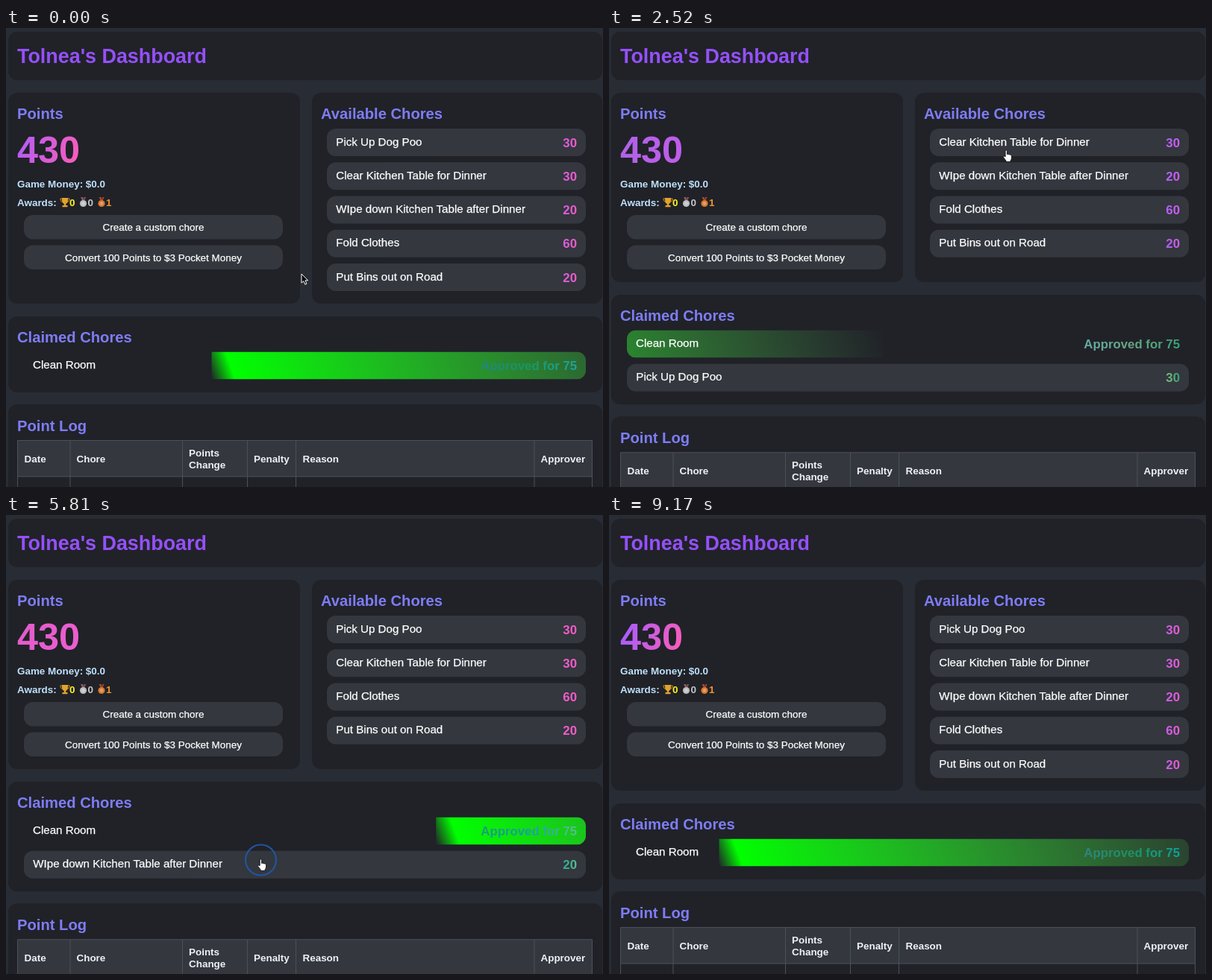
An HTML page that plays this animation: 800 px wide and 616 px high, repeating every 9.24 s.

```html
<!DOCTYPE html>
<html lang="en">
<head>
<meta charset="utf-8">
<title>Chore dashboard</title>
<style>
  html, body { margin: 0; width: 100%; height: 100%; overflow: hidden; background: #282c34; }
  svg { display: block; width: 100%; height: 100%; }
  text { font-family: "Liberation Sans", Arial, sans-serif; fill: #fff; font-size: 15.13px; }
  .t { stroke: #fff; stroke-width: .25px; }
  .b { font-weight: 700; }
  .h2 { font-weight: 700; font-size: 20.2px; fill: #7f7cf5; }
  .s { font-size: 13.44px; }
  .info { font-size: 13.44px; font-weight: 700; fill: #bfe0fb; }
  .th { font-size: 13.44px; font-weight: 700; fill: #eef1f5; }
  .num { font-size: 16.8px; font-weight: 700; text-anchor: end; }
  .panel { fill: #202228; }
  .row { fill: #34373e; }
</style>
</head>
<body>
<svg id="stage" viewBox="0 0 800 616" preserveAspectRatio="none">
  <defs>
    <linearGradient id="pointsInk" gradientUnits="userSpaceOnUse" x1="15" y1="150" x2="99" y2="176"></linearGradient>
    <linearGradient id="numInk" gradientUnits="userSpaceOnUse" x1="745" y1="0" x2="765" y2="0"></linearGradient>
    <linearGradient id="approvedInk" gradientUnits="userSpaceOnUse" x1="636" y1="0" x2="765" y2="0"></linearGradient>
    <linearGradient id="claimedInk" gradientUnits="userSpaceOnUse" x1="745" y1="0" x2="765" y2="0"></linearGradient>
    <linearGradient id="sweepInk" gradientUnits="userSpaceOnUse" x1="38" y1="141.6" x2="715" y2="-104.6">
      <stop offset="0" stop-color="#0f0" stop-opacity="0"/>
      <stop offset=".042" stop-color="#0f0"/>
      <stop offset="1" stop-color="#6d6" stop-opacity="0"/>
    </linearGradient>
    <clipPath id="rowClip"><rect x="24" width="753" height="37" rx="12"/></clipPath>
  </defs>
  <rect width="800" height="616" fill="#282c34"/>
  <rect class="panel" x="3" y="5" width="796" height="65" rx="12"/>
  <text class="b" x="15" y="47" style="font-size:26.9px;fill:#9550fb">Tolnea's Dashboard</text>

  <rect class="panel" id="left" x="3" y="87" width="391" rx="12"/>
  <text class="h2" x="15" y="122">Points</text>
  <text class="b" x="15" y="181" style="font-size:50.4px;fill:url(#pointsInk)">430</text>
  <text class="info" x="15" y="214">Game Money: $0.0</text>
  <text class="info" x="15" y="238.5">Awards:</text>
  <g fill="#e2a32c">
    <path d="M75 228h8v3q0 4-2.8 5v2h2.3v2.2h-7v-2.2h2.3v-2q-2.8-1-2.8-5z"/>
    <path d="M75 229h-2.2q0 4 3 4.5M83 229h2.2q0 4-3 4.5" fill="none" stroke="#c98a24"/>
  </g>
  <g id="medals"></g>
  <text class="info" x="85" y="238.5" style="fill:#fff21c">0</text>
  <text class="info" x="109.5" y="238.5" style="fill:#c4c6c9">0</text>
  <text class="info" x="134" y="238.5" style="fill:#f0932b">1</text>
  <rect class="row" x="24" y="251" width="347" height="32.5" rx="12"/>
  <text class="s t" x="197.5" y="272" text-anchor="middle">Create a custom chore</text>
  <rect class="row" x="24" y="291.5" width="347" height="32.5" rx="12"/>
  <text class="s t" x="197.5" y="313" text-anchor="middle">Convert 100 Points to $3 Pocket Money</text>

  <rect class="panel" id="right" x="410" y="87" width="389" rx="12"/>
  <text class="h2" x="422" y="122">Available Chores</text>
  <g id="available"></g>

  <g id="claimed">
    <rect class="panel" id="claimedPanel" x="3" width="796" rx="12"/>
    <text class="h2" x="15" y="34.5">Claimed Chores</text>
    <g transform="translate(0 47.5)">
      <g clip-path="url(#rowClip)"><rect id="sweep" width="753" height="37" fill="url(#sweepInk)"/></g>
      <text class="t" x="36" y="22.5">Clean Room</text>
      <text class="num" x="765" y="24.5" style="fill:url(#approvedInk)">Approved for 75</text>
    </g>
  </g>

  <g id="log">
    <rect class="panel" x="3" width="796" height="140" rx="12"/>
    <text class="h2" x="15" y="35.5">Point Log</text>
    <rect x="15.5" y="48.5" width="770" height="48.5" fill="#34373e"/>
    <path d="M15.5 130V48.5H785.5V130M15.5 97H785.5M86 48.5V130M236.5 48.5V130M323.5 48.5V130M388.5 48.5V130M708 48.5V130" fill="none" stroke="#4a515b"/>
    <g id="heads"></g>
  </g>

  <circle id="ring" r="20.5" fill="none" stroke="#1f559f" stroke-width="2.2"/>
  <g id="cursor" stroke-linejoin="round">
    <path id="arrow" d="M0 0V12.2L2.8 9.6 4.8 14.2 6.9 13.2 4.9 8.8H8.6Z" fill="#000" stroke="#fff" stroke-width="1"/>
    <path id="hand" d="M-1.3 8V.6a1.2 1.2 0 0 1 2.4 0V5q1.2-1 2.2.2 1.2-.7 2 .4 1.5-.4 1.7 1.2V10q-.3 2-1.4 3.5v1.3H-.4v-1.3L-3.8 9q-.6-1.8 1-1.6z" fill="#fff" stroke="#111" stroke-width=".9"/>
  </g>
</svg>
<script>
const LOOP = 9240, STEP = 70, PITCH = 45.25;
const $ = id => document.getElementById(id);

function add(parent, tag, attrs, text) {
  const el = document.createElementNS('http://www.w3.org/2000/svg', tag);
  for (const k in attrs) el.setAttribute(k, attrs[k]);
  if (text) el.textContent = text;
  return parent.appendChild(el);
}
const move = (el, x, y) => el.setAttribute('transform', `translate(${x} ${y})`);
const show = (el, on) => el.style.display = on ? '' : 'none';
const mix = (a, b, k) => a + (b - a) * k;

// Segment of a track [[at, ...], ...] around t, and the share passed.
function segment(track, t) {
  let i = 0;
  while (i < track.length - 2 && t >= track[i + 1][0]) i++;
  const a = track[i], b = track[i + 1];
  return [a, b, Math.min(1, Math.max(0, (t - a[0]) / (b[0] - a[0])))];
}
function along(track, t) {
  const [a, b, k] = segment(track, t);
  return a.slice(1).map((v, i) => mix(v, b[i + 1], k));
}
function blend(a, b, k) {
  const rgb = [0, 2, 4].map(i =>
    Math.round(mix(parseInt(a.slice(i, i + 2), 16), parseInt(b.slice(i, i + 2), 16), k)));
  return `rgb(${rgb})`;
}

// Ink colours, left to right, by phase of the shimmer.
const PHASES = [.07, .33, .62, .99];
const INKS = {
  pointsInk: ['f65fc0 955cff', '8066ff e05ade', 'a85cff ff5cb4', 'ff5cb0 e45ee0'],
  numInk: ['c45cf8 e05ce4', '9a62ff c45cf0', 'd05ce8 ee5ac8', 'ff5abc fa5ac4'],
  approvedInk: ['5cc88c acdf48 5c86b0', '6a94b4 3a80a8 22b04c', '268078 189458 109ca4', '18a878 18a4c4 7cd488'],
  claimedInk: ['94c860 5c86b0', '7cbc88 18a850', '18a458 1294a0', '30a8b0 7cd488']
};
const inkTracks = {};
for (const id in INKS) {
  const keys = INKS[id].map((s, i) => [PHASES[i], ...s.split(' ')]);
  const first = keys[0], last = keys[3];
  inkTracks[id] = [[last[0] - 1, ...last.slice(1)], ...keys, [first[0] + 1, ...first.slice(1)]];
  const n = first.length - 2;
  for (let i = 0; i <= n; i++) add($(id), 'stop', { offset: i / n });
}

const CHORES = [
  ['Pick Up Dog Poo', 30], ['Clear Kitchen Table for Dinner', 30],
  ['WIpe down Kitchen Table after Dinner', 20], ['Fold Clothes', 60], ['Put Bins out on Road', 20]
];
function choreRow(parent, [name, points], x, ink) {
  const g = add(parent, 'g', {});
  add(g, 'rect', { class: 'row', x, width: 777 - x, height: 37, rx: 12 });
  add(g, 'text', { class: 't', x: x + 12.3, y: 22.5 }, name);
  add(g, 'text', { class: 'num', x: 765, y: 24.5, style: `fill:url(#${ink})` }, String(points));
  return g;
}
const openRows = CHORES.map(c => choreRow($('available'), c, 430, 'numInk'));
const claimedRows = CHORES.map(c => choreRow($('claimed'), c, 24, 'claimedInk'));

for (const [x, y, s] of [[24.5, 78, 'Date'], [94.5, 78, 'Chore'], [245, 70, 'Points'], [245, 86, 'Change'],
  [332, 78, 'Penalty'], [397.5, 78, 'Reason'], [716.5, 78, 'Approver']])
  add($('heads'), 'text', { class: 'th', x, y }, s);

for (const [x, disc, ribbon] of [[103.5, '#b9bcc0', '#8d5a62'], [128, '#d8752a', '#a8482c']]) {
  add($('medals'), 'path', { d: `M${x - 3.5} 227h3l3 6h-3zM${x + 1} 227h2.5l-2 5z`, fill: ribbon });
  add($('medals'), 'circle', { cx: x, cy: 235.5, r: 4.6, fill: disc });
  add($('medals'), 'circle', { cx: x, cy: 235.5, r: 2.4, fill: '#fff', opacity: .3 });
}

// Claimed chores over time.
const STATES = [[0, []], [2170, [0]], [4060, [0, 2]], [5810, [2]], [6440, []]];
const CLICKS = [2100, 3990, 5740, 6370];
const CURSOR = [
  [0, 396, 330], [560, 396, 330], [1330, 531, 166], [1680, 536.5, 155], [2170, 533, 158],
  [2800, 532, 170], [3500, 529.5, 195.5], [4060, 532, 196], [4760, 537.5, 197.5], [5000, 535, 205],
  [5530, 345, 462], [5740, 341.5, 462.5], [7000, 341.5, 462.5], [8050, 340, 527], [8400, 342, 640], [9240, 342, 640]
];
// Sweep cycles passed at given times.
const CYCLES = [
  [0, .667], [1680, 2.994], [3500, 5.667], [4760, 7.335], [6580, 9.99], [8050, 12.07], [9170, 13.582], [9240, 13.667]
];

function layout(claimed) {
  const bottom = claimed.length ? 341 : 370;
  $('left').setAttribute('height', bottom - 87);
  $('right').setAttribute('height', bottom - 87);
  let slot = 0;
  openRows.forEach((row, i) => {
    const open = !claimed.includes(i);
    show(row, open);
    if (open) move(row, 0, 135 + PITCH * slot++);
  });
  claimedRows.forEach((row, i) => {
    const at = claimed.indexOf(i);
    show(row, at >= 0);
    move(row, 0, 47.5 + PITCH * (at + 1));
  });
  const top = bottom + 17, height = 102 + PITCH * claimed.length;
  move($('claimed'), 0, top);
  $('claimedPanel').setAttribute('height', height);
  move($('log'), 0, top + height + 16);
}

let shown = null;
function draw(t) {
  const state = STATES.filter(s => s[0] <= t).pop();
  if (state !== shown) layout((shown = state)[1]);

  const phase = along(CYCLES, t)[0] % 1;
  move($('sweep'), -729 + 1506 * phase, 0);
  for (const id in inkTracks) {
    const [a, b, k] = segment(inkTracks[id], phase);
    [...$(id).children].forEach((stop, i) => stop.setAttribute('stop-color', blend(a[i + 1], b[i + 1], k)));
  }

  const [x, y] = along(CURSOR, t);
  const hand = t > 1750 && t < 7400;
  move($('cursor'), x, y);
  show($('hand'), hand);
  show($('arrow'), !hand);
  show($('ring'), CLICKS.some(c => t >= c && t < c + 280));
  move($('ring'), x, y + .5);
}

const start = performance.now();
function tick() {
  const t = (performance.now() - start) % LOOP;
  draw(Math.floor(t / STEP) * STEP);
  requestAnimationFrame(tick);
}
draw(0);
requestAnimationFrame(tick);
</script>
</body>
</html>
```
